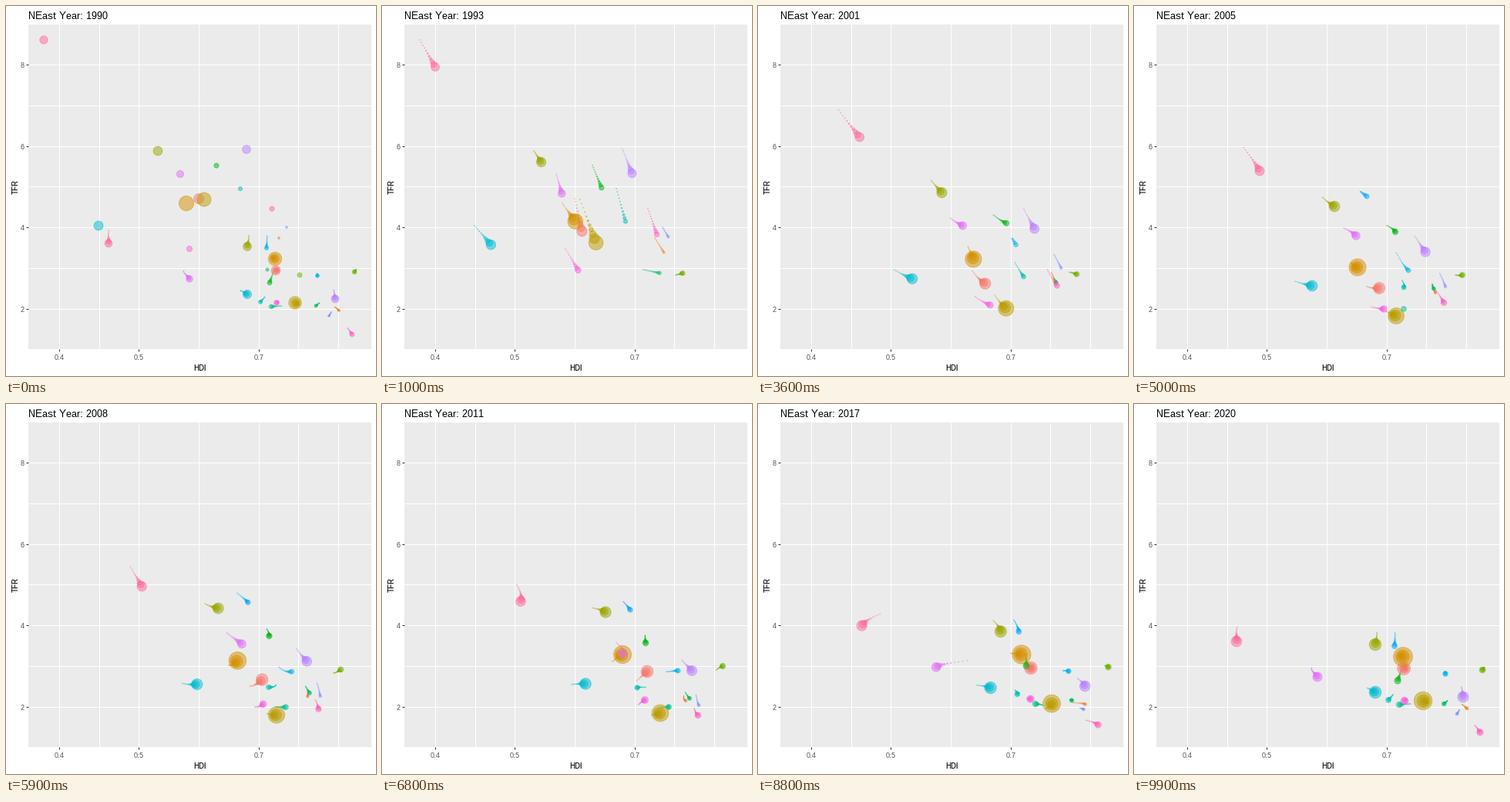
A matplotlib script that plays this animation: 480 px wide and 480 px high, repeating every 10000 ms.

```python
import numpy as np
import matplotlib.pyplot as plt
from matplotlib.animation import FuncAnimation
from matplotlib.patches import Rectangle

FRAMES = 100
WAKE = 10
GROUPS = 19
KEYS = [0, 20, 50, 68, 99]
PEAK = 88

plt.rcParams.update({"font.family": "Liberation Sans", "text.hinting": "native",
                     "text.hinting_factor": 1, "text.kerning_factor": 6})


def hcl(hue, c=100, lum=65):
    """Polar LUV to sRGB, as in evenly spaced hue palettes."""
    h = np.radians(hue)
    Y = ((lum + 16) / 116) ** 3
    u = c * np.cos(h) / (13 * lum) + 0.1978398
    v = c * np.sin(h) / (13 * lum) + 0.4683363
    X = 9 * Y * u / (4 * v)
    Z = -X / 3 - 5 * Y + 3 * Y / v
    rgb = np.array([[3.240479, -1.537150, -0.498535],
                    [-0.969256, 1.875992, 0.041556],
                    [0.055648, -0.204043, 1.057311]]) @ [X, Y, Z]
    rgb = np.clip(rgb, 0, 1)
    return np.where(rgb > 0.00304, 1.055 * rgb ** (1 / 2.4) - 0.055, 12.92 * rgb)


def smooth(t, p, f):
    """Cubic Hermite curve through points p at times t."""
    m = np.gradient(p, t, axis=0)
    i = np.clip(np.searchsorted(t, f, "right") - 1, 0, len(t) - 2)
    h = (t[i + 1] - t[i])[:, None]
    s = (f - t[i])[:, None] / h
    ease = s * s * (3 - 2 * s)
    return (p[i] * (1 - ease) + p[i + 1] * ease
            + h * s * (1 - s) * (m[i] * (1 - s) - m[i + 1] * s))


tracks = []


def country(radius, *pts, start=None, late=6):
    """Track through the last KEYS; `late` is the sideways bend before the end."""
    t = np.array(KEYS[-len(pts):], float)
    p = np.array(pts, float)
    if start is not None:
        t[0] = start
    w = (PEAK - t[-2]) / (t[-1] - t[-2])
    bend = p[-2] * (1 - w) + p[-1] * w + [late, -2]
    t = np.insert(t, -1, PEAK)
    p = np.insert(p, -1, bend, axis=0)

    f = np.arange(FRAMES)
    xy = smooth(t, p, f)
    xy[f < t[0]] = np.nan
    grow = radius * (0.78 + 0.22 * f / (FRAMES - 1))
    tracks.append(np.column_stack([xy, grow]))


country(8.9, (250, 250), (270, 329), (318, 366), (344, 347), (350, 343))
country(2.4, (354, 301), (376, 337), (391, 372), (394, 385), (432, 395))
country(12.9, (234, 256), (266, 301), (290, 339), (312, 325), (349, 328))
country(12.2, (257, 251), (297, 356), (340, 402), (361, 401), (375, 385), late=11)
country(8.2, (197, 188), (217, 217), (260, 260), (290, 270), (313, 312), late=10)
country(4.4, (381, 349), (399, 345), (426, 349), (442, 340), (452, 345))
country(4.6, (273, 207), (297, 261), (339, 293), (342, 310), (342, 359))
country(3.2, (339, 342), (378, 351), (389, 367), (399, 382), (402, 389))
country(4.2, (350, 393), (372, 393), (344, 390))
country(3.9, (304, 237), (327, 317), (350, 365), (331, 368), (330, 384))
country(8.3, (120, 285), (163, 332), (231, 363), (264, 363), (313, 374))
country(3.8, (330, 302), (356, 343), (384, 346), (404, 350), start=33)
country(3.9, (294, 241), (302, 247), (322, 267), (338, 314), start=46)
country(2.4, (364, 287), (379, 313), (404, 364), (411, 391), (419, 402))
country(7.5, (312, 186), (337, 247), (378, 319), (402, 346), (427, 380))
country(6.5, (226, 218), (242, 266), (288, 298), (312, 324), (238, 354), late=-33)
country(5.3, (238, 315), (271, 367), (324, 393), (341, 384), (351, 385))
country(4.6, (345, 263), (368, 327), (402, 385), (410, 404), (449, 426))
country(7.3, (49, 44), (90, 114), (163, 214), (180, 256), (133, 308), late=-15)

X, Y, R = np.array(tracks).transpose(2, 0, 1)
colors = np.array([[*hcl(15 + 360 * i / GROUPS), 0.5] for i in range(GROUPS)])

# Stage in pixels, y pointing down
fig = plt.figure(figsize=(480 / 72, 480 / 72), dpi=72, facecolor="white")
ax = fig.add_axes([0, 0, 1, 1])
ax.set(xlim=(0, 480), ylim=(480, 0))
ax.axis("off")

LEFT, TOP, RIGHT, BOTTOM = 29, 24, 474, 445
panel = Rectangle((LEFT, TOP), RIGHT - LEFT, BOTTOM - TOP, fc="#EBEBEB", lw=0, zorder=0)
ax.add_patch(panel)


def line(x, y, color):
    ax.plot(x, y, color=color, lw=1, solid_capstyle="butt", zorder=1)


def hdi_x(v):
    return round(69 + 1064.5 * np.log10(v / 0.4))


def tfr_y(v):
    return round(76 + 52.83 * (8 - v))


major = (0.4, 0.5, 0.7)
minor = [np.sqrt(0.4 * 0.5), np.sqrt(0.5 * 0.7), 0.7 * 1.25 ** 0.5, 0.7 * 1.25]
for v in (*major, *minor):
    line([hdi_x(v)] * 2, [TOP, BOTTOM], "white")
for v in range(2, 9):
    line([LEFT, RIGHT], [tfr_y(v)] * 2, "white")

for v in major:
    line([hdi_x(v)] * 2, [BOTTOM, BOTTOM + 3], "#333333")
    ax.text(hdi_x(v), 459, str(v), size=9, color="#4D4D4D", ha="center")
for v in range(2, 9, 2):
    line([LEFT - 3, LEFT], [tfr_y(v)] * 2, "#333333")
    ax.text(24, tfr_y(v) + 4, str(v), size=9, color="#4D4D4D", ha="right")

ax.text(251, 473, "HDI", size=11, ha="center")
ax.text(16, 235, "TFR", size=11, ha="center", rotation=90, rotation_mode="anchor")
title = ax.text(29, 17, "", size=13)

dots = ax.scatter([], [], linewidths=1, zorder=3)
dots.set_clip_path(panel)


def update(f):
    title.set_text(f"NEast Year: {round(1990 + 30 * f / (FRAMES - 1))}")
    xy, size, rgba = [], [], []
    for age in range(WAKE, -1, -1):
        k = (f - age) % FRAMES
        on = ~np.isnan(X[:, k])
        r = 0.35 + (R[on, k] - 0.85) * (1 - age / WAKE) ** 3.5
        xy.append(np.column_stack([X[on, k], Y[on, k]]))
        size.append((2 * r) ** 2)
        rgba.append(colors[on])
    rgba = np.concatenate(rgba)
    dots.set_offsets(np.concatenate(xy))
    dots.set_sizes(np.concatenate(size), 72)
    dots.set_facecolors(rgba)
    dots.set_edgecolors(rgba)
    return dots, title


anim = FuncAnimation(fig, update, frames=FRAMES, interval=100, repeat=True,
                     cache_frame_data=False)
plt.show()
```
